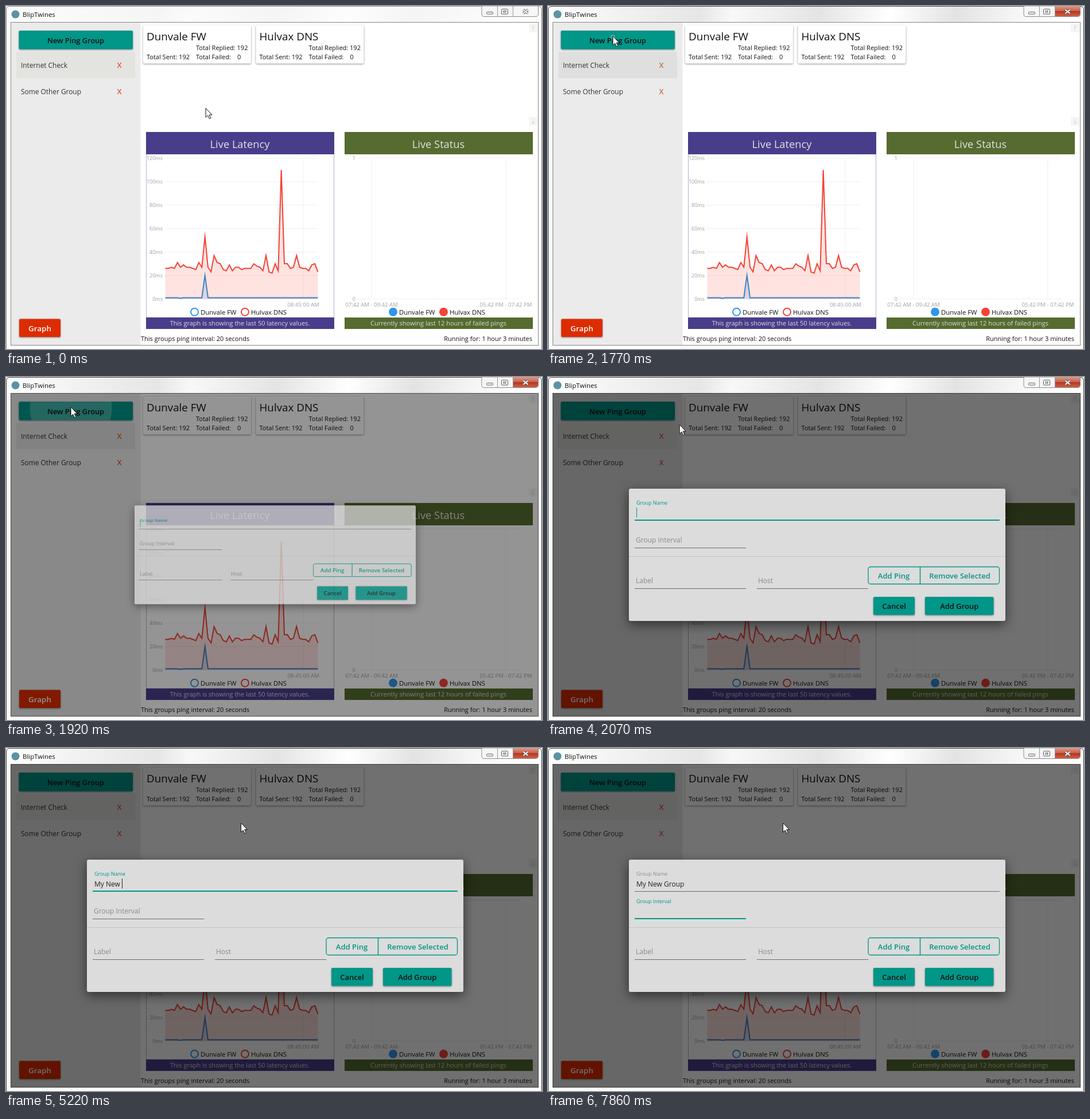
These frames come from a looping animation (934x599 px, 8 s). An HTML page:

```html
<!DOCTYPE html>
<html lang="en">
<head>
<meta charset="utf-8">
<title>BlipTwines</title>
<style>
html, body { margin: 0; width: 100%; height: 100%; overflow: hidden; background: #fff; }
svg { display: block; width: 100%; height: 100%; }
text { font-family: "Open Sans", "Noto Sans", sans-serif; white-space: pre; }
.lift { filter: drop-shadow(0 1px 1.5px rgba(0,0,0,.45)); }
.float { filter: drop-shadow(0 6px 10px rgba(0,0,0,.55)); }
</style>
</head>
<body>
<svg id="stage" viewBox="0 0 934 599" preserveAspectRatio="none"></svg>
<script>
const TEAL = '#009688', RED = '#f44336', BLUE = '#2f96e8', HINT = '#8a8a8a', LINE = '#6c6c6c';
const LABELS = ['Dunvale FW', 'Hulvax DNS'];
const LOOP = 8000, STEP = 77.5;

const rect = (x, y, w, h, fill, more = '') =>
  `<rect x="${x}" y="${y}" width="${w}" height="${h}" fill="${fill}" ${more}/>`;
const line = (x1, y1, x2, y2, color, more = '') =>
  `<path d="M${x1} ${y1}L${x2} ${y2}" stroke="${color}" fill="none" ${more}/>`;
const text = (x, y, str, size = 11, fill = '#111', more = '') =>
  `<text x="${x}" y="${y}" font-size="${size}" fill="${fill}" ${more}>${str}</text>`;
const MID = 'text-anchor="middle"', END = 'text-anchor="end"', SEMI = 'font-weight="600"';
const button = (x, y, w, h, fill, label, size, color) =>
  rect(x, y, w, h, fill, 'rx="2" class="lift"') +
  text(x + w / 2, y + h / 2 + 5.7, label, size, color, `${MID} ${SEMI}`);

function frame() {
  return `<path d="M0 599V7Q0 0 7 0H927Q934 0 934 7V599Z" fill="#fcfcfc"/>
    <g id="glass">${rect(1, 1, 932, 27, 'url(#sheen)')}</g>
    <path id="edge" d="M.5 599V7Q.5.5 7 .5H927Q933.5.5 933.5 7V599" fill="none"/>
    <circle cx="16.5" cy="14.5" r="7" fill="#5c93a3"/>
    ${text(29, 18.5, 'BlipTwines', 11.4)}
    <path d="M829 0V14Q829 18.5 833 18.5H923Q927.5 18.5 927.5 14V0Z" fill="#f6f6f6" stroke="#8d8d8d"/>
    <path id="close" d="M883.5 0V18H923Q927 18 927 14V0Z" fill="url(#closeRed)"/>
    ${line(856.5, 0, 856.5, 18, '#999')}${line(883.5, 0, 883.5, 18, '#999')}
    ${rect(837.5, 10.5, 11, 3.5, '#fff', 'stroke="#555" rx="1"')}
    ${rect(863.5, 5.5, 11, 8.5, '#fff', 'stroke="#555" rx="1"')}
    ${rect(867, 8.5, 4, 2.5, '#fff', 'stroke="#555"')}
    <g fill="none"><path d="M901.5 6.5L909.5 13M909.5 6.5L901.5 13" stroke="#555" stroke-width="4"/>
    <path d="M901.5 6.5L909.5 13M909.5 6.5L901.5 13" stroke="#fff" stroke-width="2"/></g>
    ${rect(8.5, 28.5, 919, 564, '#fff', 'stroke="#858585"')}`;
}

function card(x, name) {
  return rect(x, 34, 188, 66.5, '#fff', 'rx="2" class="lift"') +
    text(x + 6, 60, name, 18.8) +
    text(x + 92, 77, 'Total Replied: 192') +
    text(x + 6, 93, 'Total Sent: 192') +
    text(x + 92, 93, 'Total Failed:') + text(x + 164, 93, '0');
}

function scroller(y, arrow) {
  return rect(911, y, 15, 15, '#f5f5f5') +
    `<path d="${arrow}" transform="translate(918.5 ${y + 7.5})" stroke="#d8d8d8" fill="none"/>`;
}

function grid() {
  let out = rect(244.5, 258, 327, 286, 'none', 'stroke="#b4afd2"');
  for (let i = 0; i <= 6; i++) {
    const y = 511.5 - i * 40.95;
    out += line(277, y, 543, y, '#efefef') + text(273, y + 3.2, i * 20 + 'ms', 9, '#a0a0a0', END);
  }
  out += line(518, 266, 518, 511, '#efefef') + text(518, 525, '08:45:00 AM', 9.6, '#a0a0a0', MID);
  for (const [y, n] of [[265.5, 1], [511.5, 0]])
    out += line(613, y, 894, y, '#efefef') + text(609, y + 3.2, n, 9, '#a0a0a0', END);
  for (const [x, s] of [[637, '07:42 AM - 09:42 AM'], [871, '05:42 PM - 07:42 PM']])
    out += line(x, 266, x, 511, '#efefef') + text(x, 525, s, 9.6, '#a0a0a0', MID);
  return out;
}

function series(values, color) {
  const pts = values.map((v, i) => `${(277.5 + i * 5.32).toFixed(1)} ${(511.5 - v * 2.047).toFixed(1)}`).join('L');
  return `<path d="M${pts}L543.5 511.5H277.5Z" fill="${color}" opacity=".15"/>
    <path d="M${pts}" fill="none" stroke="${color}" stroke-width="2" stroke-miterlimit="12"/>`;
}

function banner(x, color, title, note) {
  return rect(x, 220, 328, 39, color) + text(x + 163.5, 248, title, 18.3, '#e2e2e2', MID) +
    rect(x, 544, 328, 20, color) + text(x + 163.5, 558, note, 11, '#dcdcdc', MID);
}

const dot = (x, color, solid) =>
  `<circle cx="${x}" cy="534.3" r="6.5" fill="${solid ? color : '#fff'}" stroke="${color}" stroke-width="2"/>`;

function legend(x, solid) {
  return dot(x, BLUE, solid) + text(x + 10.5, 539, LABELS[0], 11.3) +
    dot(x + 88, RED, solid) + text(x + 98.5, 539, LABELS[1], 11.3);
}

function charts() {
  const remote = [26, 26, 27, 26, 31, 27, 29, 27, 27, 26, 25, 31, 27, 53, 27, 23, 37, 31, 30, 25, 24, 29, 24,
    27, 27, 25, 26, 26, 26, 30, 28, 27, 24, 37, 23, 22, 30, 24, 110, 30, 30, 26, 27, 37, 27, 26, 26, 24, 29, 30, 23];
  const local = remote.map((_, i) => i === 13 ? 20 : i === 5 ? .5 : 1);
  return grid() +
    banner(244, '#483d8b', 'Live Latency', 'This graph is showing the last 50 latency values.') +
    banner(590, '#556b2f', 'Live Status', 'Currently showing last 12 hours of failed pings') +
    series(remote, RED) + series(local, '#3f83c4') + legend(328.5, false) + legend(674.5, true);
}

function sidebar() {
  return rect(9, 29, 225.5, 563, '#ebebeb') + rect(18, 80, 207, 46, '#e3e3e0', 'id="row"') +
    text(26, 107.5, 'Internet Check', 11.9, '#333') + text(26, 154, 'Some Other Group', 11.9, '#333') +
    rect(22.5, 43, 198.5, 32.5, TEAL, 'rx="2" class="lift"') +
    `<circle id="ripple" cx="113" cy="54" fill="#fff" clip-path="url(#btn)"/>` +
    text(121.5, 65, 'New Ping Group', 12.75, '#111', `${MID} ${SEMI}`) +
    `<g id="cross">${[107.5, 154].map(y => text(197.5, y, 'X', 13, 'currentColor', `${MID} ${SEMI}`)).join('')}</g>` +
    button(23, 546.5, 72, 31.5, '#dd2c00', 'Graph', 13.4, '#fff');
}

function dialog() {
  return `<g id="dialog">
    ${rect(141, 195, 656, 231, '#dcdcdc', 'rx="3" class="float"')}
    ${line(141, 313.5, 797, 313.5, '#c3c3c3')}
    ${line(151, 250.5, 787, 250.5, LINE)}${line(151, 298.5, 345, 298.5, LINE)}
    ${line(151, 369.5, 345, 369.5, LINE)}${line(364, 369.5, 558, 369.5, LINE)}
    <path id="nameLine" stroke="${TEAL}" stroke-width="2"/><path id="gapLine" stroke="${TEAL}" stroke-width="2"/>
    ${text(0, 0, 'Group Name', 12, HINT, 'id="nameHint"')}
    ${text(0, 0, 'Group Interval', 12, HINT, 'id="gapHint"')}
    ${text(153, 360, 'Label', 12, HINT)}${text(366, 360, 'Host', 12, HINT)}
    ${text(154, 242, '', 12, '#222', 'id="typed"')}
    ${rect(154, 228, 1, 17.5, TEAL, 'id="caret"')}
    ${rect(558, 331.5, 228.5, 30, 'none', `rx="4" stroke="${TEAL}" stroke-width="1.3"`)}
    ${line(648.5, 331, 648.5, 362, TEAL, 'stroke-width="1.5"')}
    ${text(602.5, 352, 'Add Ping', 13, TEAL, `${MID} ${SEMI}`)}
    ${text(717.5, 352, 'Remove Selected', 13, TEAL, `${MID} ${SEMI}`)}
    ${button(567, 384, 72, 31.5, TEAL, 'Cancel', 13, '#111')}
    ${button(657, 384, 119.5, 31.5, TEAL, 'Add Group', 13, '#111')}
  </g>`;
}

document.getElementById('stage').innerHTML = `<defs>
  <linearGradient id="sheen" gradientUnits="userSpaceOnUse" x1="0" y1="0" x2="934" y2="120">
    <stop offset="0" stop-color="#fff"/><stop offset=".12" stop-color="#f3f3f3"/>
    <stop offset=".28" stop-color="#e6e6e6"/><stop offset=".34" stop-color="#f8f8f8"/>
    <stop offset=".5" stop-color="#e4e4e4"/><stop offset=".63" stop-color="#fff"/>
    <stop offset=".75" stop-color="#e3e3e3"/><stop offset=".87" stop-color="#f7f7f7"/><stop offset="1" stop-color="#fff"/>
  </linearGradient>
  <linearGradient id="closeRed" x2="0" y2="1">
    <stop offset="0" stop-color="#dd9a8a"/><stop offset=".48" stop-color="#c8604c"/>
    <stop offset=".5" stop-color="#b2341c"/><stop offset="1" stop-color="#cc6248"/>
  </linearGradient>
  <clipPath id="btn">${rect(22.5, 43, 198.5, 32.5, '#000', 'rx="2"')}</clipPath>
  </defs>
  ${frame()}${sidebar()}
  ${card(239, LABELS[0])}${card(435.5, LABELS[1])}
  ${scroller(31, 'M0 4V-4M-3 -1L0 -4 3 -1')}${scroller(194, 'M0 -4V4M-3 1L0 4 3 1')}
  ${charts()}
  ${text(235, 585, 'This groups ping interval: 20 seconds')}
  ${text(917, 585, 'Running for: 1 hour 3 minutes', 11, '#111', END)}
  ${rect(8, 28, 920, 565, '#000', 'id="shade"')}
  ${dialog()}
  <path id="cursor" d="M0 0V16L3.7 12.6 6.4 18.4 8.8 17.3 6.2 11.6H11Z" fill="#fff" stroke="#111" stroke-linejoin="round"/>`;

const el = {};
document.querySelectorAll('[id]').forEach(e => el[e.id] = e);
const set = (e, attrs) => { for (const k in attrs) e.setAttribute(k, attrs[k]); };

const span = (t, a, b) => Math.min(1, Math.max(0, (t - a) / (b - a)));
const mix = (a, b, u) => a + (b - a) * u;
const sineOut = u => Math.sin(u * Math.PI / 2);
const sineInOut = u => (1 - Math.cos(u * Math.PI)) / 2;
const quadOut = u => 1 - (1 - u) ** 2;

const PHRASE = 'My New Group';
const KEYS = [4380, 4530, 4690, 4840, 5070, 5070, 5220, 5530, 5700, 5800, 5890, 5990];
const CARET_ON = [[0, 2310], [2840, 3370], [3920, 6540], [7080, 7610]];

function underline(e, x1, x2, y, u) {
  const c = (x1 + x2) / 2, h = (x2 - x1) / 2 * u;
  set(e, { d: `M${c - h} ${y}H${c + h}`, opacity: u > 0 ? 1 : 0 });
}

function hint(e, y, u, focused) {
  set(e, { x: mix(153, 154, u), y: mix(y, y - 18, u), 'font-size': mix(12, 9, u), fill: focused ? TEAL : HINT });
}

function draw(clock) {
  const t = clock < 205 ? 0 : clock < 3010 ? 205 + Math.floor((clock - 205) / STEP) * STEP : clock;
  const active = t >= 1670, open = sineOut(span(t, 1765, 2035));

  const go = sineInOut(span(t, 140, 1560)), back = quadOut(span(t, 1925, 2561));
  const x = mix(mix(348, 113, go), 409.5, back), y = mix(mix(178.5, 52.5, go), 131, back);
  set(el.cursor, { transform: `translate(${x} ${y})` });

  set(el.edge, { stroke: active ? '#444' : '#888' });
  set(el.glass, { opacity: active ? 1 : .3 });
  set(el.close, { opacity: active ? 1 : 0 });
  set(el.row, { fill: x < 225 && t > 600 ? '#dfdfdf' : '#e3e3e0' });
  set(el.cross, { color: active && open === 0 ? '#bf7443' : '#e2543c' });

  const wave = span(t, 1745, 2045);
  set(el.ripple, { r: 130 * wave, opacity: wave > 0 ? .26 * (1 - span(t, 1900, 2060)) : 0 });

  set(el.shade, { opacity: .56 * open });
  set(el.dialog, {
    opacity: open,
    transform: `translate(469 310.5) scale(${Math.max(open, .001)}) translate(-469 -310.5)`
  });

  const swap = sineInOut(span(t, 6980, 7330)), next = t >= 7000;
  hint(el.nameHint, 241, span(t, 1840, 2000), !next);
  hint(el.gapHint, 288.5, swap, next);
  underline(el.nameLine, 151, 787, 250, sineInOut(span(t, 1925, 2060)) * (1 - swap));
  underline(el.gapLine, 151, 345, 298, swap);

  const typed = PHRASE.slice(0, KEYS.filter(k => t >= k).length);
  if (el.typed.textContent !== typed) el.typed.textContent = typed;
  const width = typed && !next ? el.typed.getComputedTextLength() : 0;
  set(el.caret, {
    x: 154 + width, y: next ? 275 : 228, fill: typed && !next ? '#222' : TEAL,
    opacity: CARET_ON.some(([a, b]) => t >= a && t < b) ? 1 : 0
  });
}

const start = performance.now();
function tick() {
  draw((performance.now() - start) % LOOP);
  requestAnimationFrame(tick);
}
tick();
</script>
</body>
</html>
```
